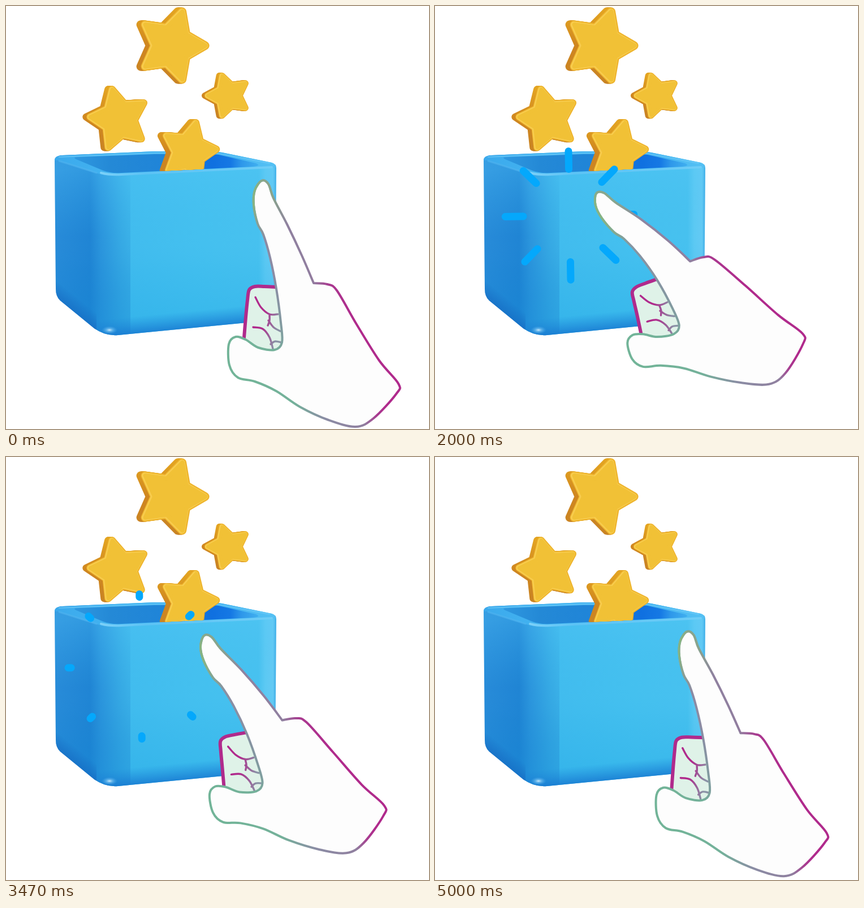
Write an HTML page with a canvas that moves like this. It is 748 px wide and 748 px high and loops after 5070 ms.

```html
<!DOCTYPE html>
<html lang="en">
<head>
<meta charset="utf-8">
<title>Tap the box</title>
<style>
html, body { margin: 0; width: 100%; height: 100%; overflow: hidden; background: #fff; }
canvas { display: block; width: 100vw; height: 100vh; }
</style>
</head>
<body>
<canvas id="stage" width="748" height="748"></canvas>
<script>
const SIZE = 748, RAD = Math.PI / 180;
const ctx = document.getElementById('stage').getContext('2d');

function gradient(c, x0, y0, x1, y1, ...stops) {
  const g = c.createLinearGradient(x0, y0, x1, y1);
  stops.forEach(([at, color]) => g.addColorStop(at, color));
  return g;
}

function fillPath(c, d, style) {
  c.fillStyle = style;
  c.fill(new Path2D(d));
}

function strokePath(c, d, style, width) {
  c.strokeStyle = style;
  c.lineWidth = width;
  c.stroke(new Path2D(d));
}

// ---------- still scene: box and stars ----------

// a rounded five-pointed slab, its thickness running to the left
function star(c, x, y, radius, angle, squash, round, depth) {
  const path = new Path2D();
  for (let i = 0; i < 10; i++) {
    const r = i % 2 ? radius * 0.53 : radius, a = (angle + i * 36) * RAD;
    path.lineTo(x + r * squash * Math.cos(a), y + r * Math.sin(a));
  }
  path.closePath();
  const layer = (shift, width, style) => {
    c.save();
    c.translate(shift, 0);
    c.lineWidth = width;
    c.fillStyle = c.strokeStyle = style;
    c.fill(path);
    c.stroke(path);
    c.restore();
  };
  const side = gradient(c, 0, y - radius, 0, y + radius, [0, '#e3a422'], [0.5, '#cf8620'], [1, '#c98424']);
  for (let i = depth; i > 0; i--) layer(-i, round * 2, side);
  layer(0, round * 2, '#eeb42c');
  layer(-0.6, round * 1.5, '#f8cc4e');
  layer(0.4, round, '#f1c136');
}

function paintBox(c) {
  const body = 'M86 273 Q86 265 99 264 L262 257 Q366 256 382 259 L470 277 Q478 279 478 287 ' +
    'L476 535 Q475 554 456 557 L198 582 Q176 584 156 570 L96 521 Q88 514 88 500 Z';
  fillPath(c, body, gradient(c, 86, 0, 478, 0, [0, '#2b90dc'], [0.16, '#2289d7'], [0.21, '#2f9ce1'],
    [0.3, '#3cb4ea'], [0.34, '#41bcee'], [0.65, '#44c0ef'], [0.92, '#47c1ef'], [0.95, '#5cc9f3'], [0.985, '#64caf4'], [1, '#3aa9e4']));
  c.save();
  c.clip(new Path2D(body));
  fillPath(c, 'M80 250 H490 V600 H80 Z', gradient(c, 0, 290, 0, 582, [0, 'rgba(90,200,248,.25)'], [0.4, 'rgba(70,190,240,0)'],
    [0.6, 'rgba(20,160,225,.08)'], [1, 'rgba(20,160,225,.3)']));
  fillPath(c, 'M80 290 H220 V600 H80 Z', gradient(c, 86, 290, 130, 520, [0, 'rgba(15,100,190,0)'], [1, 'rgba(15,100,190,.22)']));
  fillPath(c, 'M150 500 H490 V600 H150 Z', gradient(c, 300, 542, 303, 573, [0, 'rgba(28,130,215,0)'], [1, 'rgba(24,120,208,.85)']));
  fillPath(c, 'M80 480 H160 V600 H80 Z', gradient(c, 142, 528, 126, 548, [0, 'rgba(20,100,190,0)'], [1, 'rgba(20,100,190,.6)']));
  c.restore();

  const rim = 'M86 273 Q86 265 99 264 L262 257 Q366 256 382 259 L470 277 Q478 280 474 286 L200 300 Q176 301 162 296 L92 273 Z';
  fillPath(c, rim, gradient(c, 86, 0, 478, 0, [0, '#3ba9ec'], [0.3, '#44b5f1'], [0.7, '#3fb0f0'], [1, '#55c1f4']));
  strokePath(c, 'M94 267 L262 260 Q364 258 382 262 L466 278', 'rgba(116,205,250,.6)', 2);

  const hole = 'M124 271 Q116 267 130 267 L262 262 Q360 261 376 263 L442 278 Q452 282 438 284 L205 295 Q184 296 172 291 Z';
  fillPath(c, hole, gradient(c, 120, 0, 450, 0, [0, '#2f98e0'], [0.2, '#2489d6'], [0.5, '#1f84d8'],
    [0.74, '#0f70e0'], [0.84, '#1578e4'], [0.9, '#2e98ea'], [1, '#43b2f0']));
}

function paintStars(c) {
  c.lineJoin = 'round';
  star(c, 293.5, 70, 63, -72, 0.93, 7.5, 8);
  star(c, 200, 200, 54, -104, 0.95, 6.5, 7);
  star(c, 393.5, 158.5, 37, -108, 1, 5.5, 5);
  c.save();
  c.clip(new Path2D('M240 180 H400 V286 L355 288 L272 292 H240 Z'));
  star(c, 324, 257, 52, -76, 0.92, 6.5, 9);
  c.restore();
}

function paintShine(c) {
  strokePath(c, 'M168 295 Q182 299 204 298 L470 285', gradient(c, 168, 0, 478, 0, [0, '#7bd0f8'], [0.25, '#5cc3f5'], [1, '#6fcdf7']), 4);
  strokePath(c, 'M94 274 L160 295', 'rgba(80,180,240,.6)', 3);
  const spot = c.createRadialGradient(0, 0, 0, 0, 0, 14);
  spot.addColorStop(0, 'rgba(225,245,255,.9)');
  spot.addColorStop(0.4, 'rgba(150,215,250,.5)');
  spot.addColorStop(1, 'rgba(90,180,240,0)');
  c.save();
  c.translate(183, 573);
  c.scale(1, 0.5);
  c.fillStyle = spot;
  c.fillRect(-20, -20, 40, 40);
  c.restore();
}

function paintScene() {
  const layer = document.createElement('canvas');
  layer.width = layer.height = SIZE;
  const c = layer.getContext('2d');
  c.fillStyle = '#fff';
  c.fillRect(0, 0, SIZE, SIZE);
  c.lineCap = 'round';
  paintBox(c);
  paintStars(c);
  paintShine(c);
  return layer;
}

// ---------- hand: one outline, bent along a spine from wrist to fingertip ----------

const HAND = [544,490, 523,441, 497,386, 473,340, 464,315, 452,309, 440,326, 438,352, 445,385, 455,404,
  467,445, 478,500, 486,560, 488,595, 475,608, 446,604, 424,590, 406,585, 394,598, 395,635, 410,657,
  440,664, 478,681, 520,709, 570,732, 618,744, 650,729, 690,686, 694,668, 660,627, 620,563, 585,503, 568,492, 544,490];
const CURL = [478,497, 457,496, 440,496, 430,502, 427,520, 424,550, 421,586, 446,604, 475,608, 500,585, 500,510];
const CREASES = [
  [441,515, 451,533, 466,545, 481,545],
  [466,547, 466,556, 463,565],
  [464,556, 473,568, 485,575],
  [437,568, 454,571, 466,586, 472,606],
  [468,598, 476,593, 487,595]
];
const SPINE = 62.9, LENGTH = 448;

function bend(x, y, s) {
  const dx = x - 656, dy = y - 708, cos = Math.cos(SPINE * RAD), sin = Math.sin(SPINE * RAD);
  const along = -dx * cos - dy * sin, across = dx * sin - dy * cos;
  const turn = d => (SPINE - s * (9.2 + 17 * d / LENGTH)) * RAD;
  const a = turn(along / 2), b = turn(along + 0.55 * across);
  return [656 - 28 * s - along * Math.cos(a) + across * Math.sin(b),
    708 - 66 * s - along * Math.sin(a) - across * Math.cos(b)];
}

function pose(flat, s) {
  const pts = [];
  for (let i = 0; i < flat.length; i += 2) pts.push(bend(flat[i], flat[i + 1], s));
  return pts;
}

// smooth line through the points
function curve(pts) {
  const path = new Path2D(), last = pts.length - 1;
  const at = i => pts[Math.max(0, Math.min(last, i))];
  path.moveTo(...pts[0]);
  for (let i = 0; i < last; i++) {
    const [p, q, r, t] = [at(i - 1), at(i), at(i + 1), at(i + 2)];
    path.bezierCurveTo(q[0] + (r[0] - p[0]) / 6, q[1] + (r[1] - p[1]) / 6,
      r[0] - (t[0] - q[0]) / 6, r[1] - (t[1] - q[1]) / 6, r[0], r[1]);
  }
  return path;
}

function line(path, style, width) {
  ctx.strokeStyle = style;
  ctx.lineWidth = width;
  ctx.stroke(path);
}

function drawHand(s) {
  const between = (x0, y0, x1, y1, ...stops) => gradient(ctx, ...bend(x0, y0, s), ...bend(x1, y1, s), ...stops);
  const ink = between(410, 621, 614, 547, [0, '#72b498'], [0.3, '#74b19a'], [0.5, '#8b8ca4'], [0.78, '#907f9f'], [0.9, '#a83b90'], [1, '#b02a8c']);
  const creaseInk = between(455, 550, 484, 556, [0, '#b02a8c'], [0.4, '#a04f95'], [1, '#8a93a6']);
  const tip = ctx.createRadialGradient(...bend(432, 335, s), 0, ...bend(432, 335, s), 85);
  tip.addColorStop(0.2, '#86b483');
  tip.addColorStop(1, 'rgba(134,180,131,0)');

  const curl = pose(CURL, s);
  ctx.fillStyle = '#dff2e8';
  ctx.fill(curve(curl));
  line(curve(curl.slice(0, 7)), '#b02a8c', 6);
  CREASES.forEach(flat => line(curve(pose(flat, s)), creaseInk, 3.4));

  const outline = curve(pose(HAND, s));
  ctx.fillStyle = '#fdfdfd';
  ctx.fill(outline);
  line(outline, ink, 4);
  line(outline, tip, 4);
}

// ---------- burst: eight rays, the tail chasing the head ----------

function drawBurst(step) {
  if (step <= 6 || step >= 12) return;
  const reach = x => 128 * (1 - (1 - Math.max(0, Math.min(1, x))) ** 2);
  const head = reach((step - 6) / 4.5), tail = reach((step - 7) / 5);
  ctx.beginPath();
  for (let i = 0; i < 8; i++) {
    const x = Math.cos((i * 45 - 1) * RAD), y = Math.sin((i * 45 - 1) * RAD);
    ctx.moveTo(238 + x * tail, 370.5 + y * tail);
    ctx.lineTo(238 + x * head, 370.5 + y * head);
  }
  line2d('#04a8fc', 13);
}

function line2d(style, width) {
  ctx.strokeStyle = style;
  ctx.lineWidth = width;
  ctx.stroke();
}

// ---------- timing: a tap of 15 short steps, then a brief rest ----------

const LOOP = 5070, TICK = 200 / 3, TAP = 1283, STEP = 80, STEPS = 15;

function draw(ms) {
  const tick = Math.floor((ms + 6) / TICK);
  const step = Math.floor(((tick * TICK + 4) % TAP) / STEP) % STEPS;
  const press = 1.35 * Math.max(0, Math.cos(Math.PI * (step - 7.6) / STEPS)) ** 2.3;
  ctx.lineCap = ctx.lineJoin = 'round';
  ctx.drawImage(scene, 0, 0);
  drawBurst(step);
  drawHand(press);
}

const scene = paintScene();
const start = performance.now();
function loop() {
  draw((performance.now() - start) % LOOP);
  requestAnimationFrame(loop);
}
loop();
</script>
</body>
</html>
```
